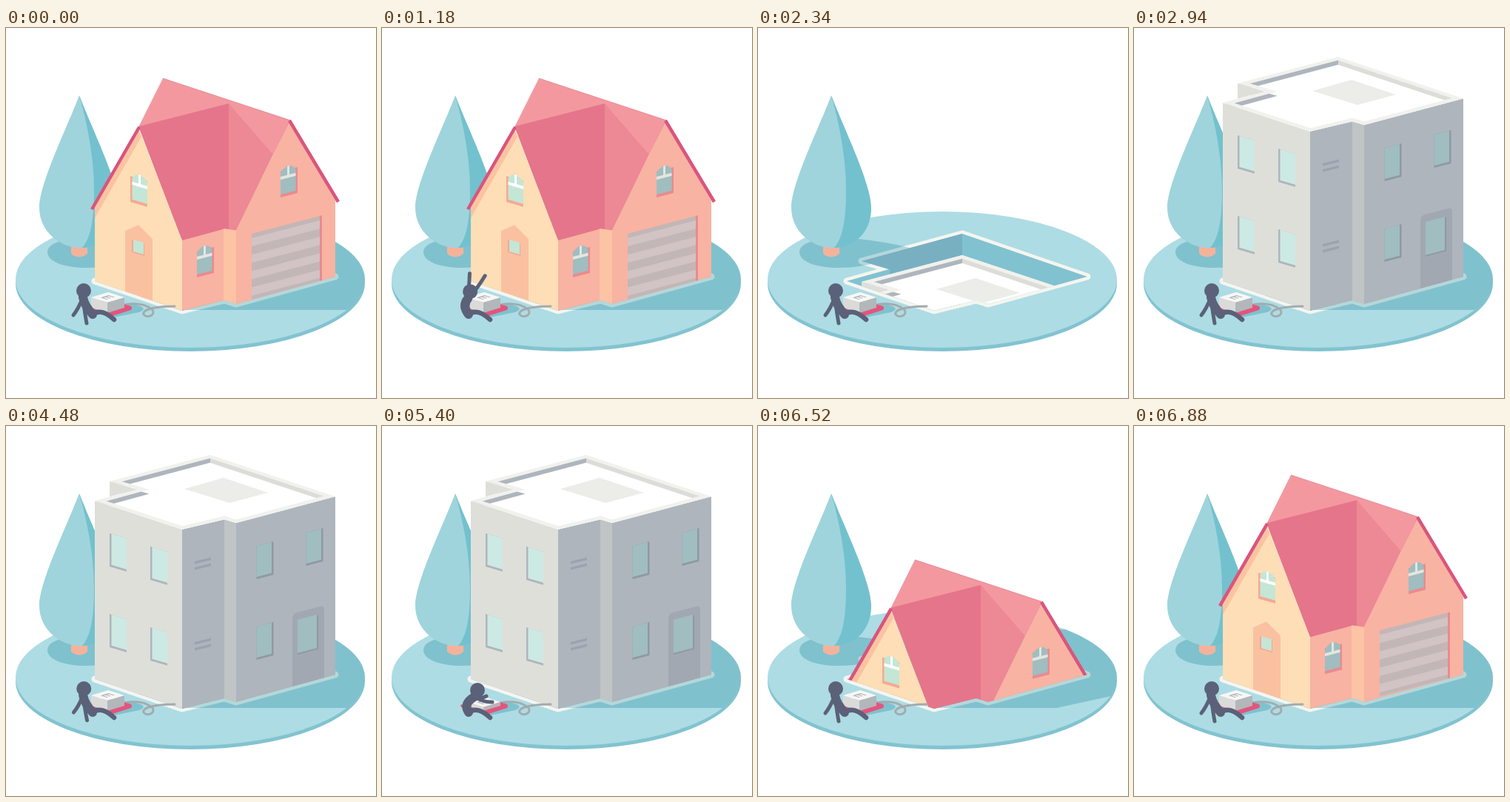
Recreate the animation shown at these times as an HTML page with a canvas. Size 500 by 500 pixels, loop 7880 ms.

```html
<!DOCTYPE html>
<html>
<head>
<meta charset="utf-8">
<style>
html, body { margin: 0; width: 100%; height: 100%; overflow: hidden; background: #fff; }
canvas { display: block; width: 100vw; height: 100vh; }
</style>
</head>
<body>
<canvas id="stage" width="500" height="500"></canvas>
<script>
const g = document.getElementById('stage').getContext('2d');
const LOOP = 7880, HALF = 3980, DEPTH = 320, WALL = 240;
const SHADE = '#bde0e7', GLASS = '#cde9e3', DIM = '#a0bdc0', INK = '#5b6178';
const PALE = '#dfdfda', GRAY = '#aeb5bd', EDGE = '#f1f1ed', TRIM = '#8f99a3';

const layer = draw => { g.save(); draw(); g.restore(); };
const trace = points => {
  g.beginPath();
  points.forEach(p => g.lineTo(...p));
  g.closePath();
};
const poly = (color, ...points) => { trace(points); g.fillStyle = color; g.fill(); };
const shape = (color, d) => { g.fillStyle = color; g.fill(new Path2D(d)); };
const rect = (color, ...r) => { g.fillStyle = color; g.fillRect(...r); };
const line = (color, width, d) => {
  g.strokeStyle = color;
  g.lineWidth = width;
  g.stroke(new Path2D(d));
};
const outline = (color, points) => {
  trace(points);
  g.strokeStyle = color;
  g.lineWidth = 9;
  g.stroke();
};
const oval = (color, x, y, rx, ry) => {
  g.beginPath();
  g.ellipse(x, y, rx, ry, 0, 0, 7);
  g.fillStyle = color;
  g.fill();
};
// Upright parallelogram whose top and bottom fall by `slope`
const slant = (color, x, y, w, h, slope) =>
  poly(color, [x, y], [x + w, y + w * slope], [x + w, y + w * slope + h], [x, y + h]);

const span = (t, a, b) => Math.min(1, Math.max(0, (t - a) / (b - a)));
const sine = p => (1 - Math.cos(Math.PI * p)) / 2;
const mix = (a, b, p) => a.map((v, i) => v + (b[i] - v) * p);

// Footprint: the front chain from left to right, then the back
const FRONT = [[120, 342], [238, 382], [295, 368], [311, 373], [445, 336]];
const BASE = [...FRONT, [276, 278], [140, 315], [177, 326]];
const ROOF = BASE.map(([x, y]) => [x, y * .97 - 230.7]);
const ABOVE = [[100, 336], ...FRONT, [460, 332], [460, -50], [100, -50]];

// How far he leans forward, then both hands
const REST = [0, 91, 388, 109, 399];
const RAISED = [.58, 118, 331, 139, 334];
const PRESS = [1, 141, 365, 149, 373];

// Window in a slanted wall; dir 1 is the left wall, -1 the right one
function pane(x, y, dir, frame, glass, bars) {
  layer(() => {
    g.transform(dir, dir > 0 ? .29 : .26, 0, 1, x, y);
    if (!bars) {
      rect(frame, 0, 0, 23, 45);
      rect(glass, 2.5, 0, 20.5, 42);
      return;
    }
    rect(frame, 0, 2, 23, 35);
    shape(glass, 'M2.5 33V4C5-1 9-3 12.5-3S20-1 23 4V33Z');
    rect(bars, 11, -3, 3, 13);
    rect(bars, 2.5, 9, 20.5, 4);
  });
}

function house() {
  const wall = '#f8b3a2', rose = '#e98b8f', bars = '#e3e6e0';
  poly('#f3989f', [212, 68], [385, 125], [361, 172], [301, 103], [179, 134]);
  poly('#e5758b', [179, 133], [301, 102], [301, 273], [238, 288]);
  poly('#ed8895', [301, 102], [361, 171], [311, 275], [301, 272]);
  poly(wall, [384, 127], [445, 233], [445, 360], [311, 400], [311, 273], [361, 171]);
  slant(wall, 238, 287, 57, 120, -.27);
  slant('#fcc3a5', 294, 271, 17, 120, .15);
  poly('#fedeb6', [180, 137], [238, 287], [238, 400], [120, 400], [120, 240]);
  poly('#fbc3a2', [179, 137], [183, 147], [120, 257], [120, 238]);
  g.lineCap = 'butt';
  line('#e07f90', .8, 'M212 68L385 125');
  line('#d9557d', 4.5, 'M116 245L180 134M383 125L449 235');

  poly('#fac1a0', [161, 274], [179, 266], [198, 285], [198, 380], [161, 367]);
  slant('#f4a893', 170, 286, 17, 17, .29);
  slant('#c4e6d6', 172, 286, 14, 16, .29);
  pane(168, 198, 1, '#f6a992', '#c4e6d6', '#fff');
  pane(281, 294, -1, rose, DIM, bars);
  pane(394, 186, -1, rose, DIM, bars);

  slant('#c3b6b7', 332, 278, 92, 89, -.26);
  for (let y = 284; y < 360; y += 22.2) slant('#d2c4c4', 332, y, 92, 11.1, -.26);
  slant(rose, 424, 254, 3, 89, -.26);
}

function block() {
  const wall = (color, i, j) => {
    const down = ([x, y]) => [x, y + 15];
    poly(color, ROOF[i], ROOF[j], down(BASE[j]), down(BASE[i]));
  };
  wall(PALE, 6, 7);
  [PALE, GRAY, '#c0c4c5', GRAY].forEach((color, i) => wall(color, i, i + 1));

  layer(() => {
    trace(ROOF);
    g.clip();
    rect('#fff', 100, 0, 400, 200);
    // The inner side of the parapet is its own outline, lowered
    const inner = g.createLinearGradient(275, 0, 277, 0);
    inner.addColorStop(.5, GRAY);
    inner.addColorStop(.5, '#dcdcd8');
    outline(inner, ROOF.map(([x, y]) => [x, y + 6]));
    outline(EDGE, ROOF);
  });
  poly('#ecede9', [294, 70], [354, 90], [302, 104], [241, 85]);

  for (const y of [0, 109]) {
    pane(140, 145 + y, 1, GRAY, GLASS);
    pane(195, 163 + y, 1, GRAY, GLASS);
    pane(361.5, 156 + y, -1, TRIM, DIM);
    for (const d of [0, 8]) slant('#9ca3ae', 255, 183 + y + d, 22, 3.5, -.25);
  }
  pane(428.5, 138, -1, TRIM, DIM);
  shape('#a1a8b2', 'M387 353V260Q387 254 393 252L424 244Q430 242 430 249V341Z');
  slant(TRIM, 394, 263, 28, 46, -.27);
  slant(DIM, 394, 262, 26, 45, -.27);
}

function ground(drop) {
  oval('#82c3d0', 249, 345, 236, 92);
  oval('#addce4', 249, 340, 236, 92);
  layer(() => {
    g.clip();
    g.lineJoin = 'round';
    outline('#f5f5f0', BASE);
    g.globalCompositeOperation = 'multiply';
    shape(SHADE, 'M56 303C56 288 85 284 115 284C150 285 180 291 205 297C185 311 150 324 108 324C80 324 56 316 56 303Z');
    const len = 1.3 * (WALL - drop);
    if (len > 0) {
      poly(SHADE, [276, 275], [276 + len, 275], [445 + len, 336], [238 + len, 381], [238, 381]);
    }
    shape(SHADE, 'M118 381L146 391L180 384Q190 380 182 376L165 372Z');
  });
  layer(() => {
    trace(BASE);
    g.clip();
    rect('#81c2d0', 100, 260, 360, 140);
    rect('#78b0c2', 130, 260, 146, 66);
    rect('#78b0c2', 178, 325, 98, 75);
  });
}

function tree() {
  const right = 'C130 297 153 276 153 243C153 210 116 136 99 91Z';
  shape('#f3b39b', 'M88 288H110V305Q99 314 88 305Z');
  shape('#9fd4dc', 'M99 91C82 136 45 210 45 243C45 276 75 297 99 297' + right);
  shape('#73c1ce', 'M99 91C110 130 119 175 119 220C119 260 114 285 103 297' + right);
}

function key(down) {
  line('#a3abae', 3, 'M160 374C175 371 190 373 198 381C203 388 190 393 186 387C183 379 208 376 228 376');
  shape('#e3557c', 'M106 377L138 367L169 376Q171 379 169 381L144 389Q142 390 139 389L107 380Z');
  layer(() => {
    g.translate(0, down);
    slant('#dadbd9', 115, 364, 22, 14 - down, .32);
    slant('#b2b7bb', 137, 371, 23, 14 - down, -.3);
    poly('#f7f7f5', [115, 364], [138, 357], [160, 364], [137, 371]);
    g.transform(.95, .3, -.95, .3, 137.5, 364);
    g.font = 'bold 16px Arial, "Liberation Sans", sans-serif';
    g.textAlign = 'center';
    g.fillStyle = '#adb3b7';
    g.fillText('E', 0, 5.7);
  });
}

function man([lean, ...hands]) {
  const head = [105 + 24 * lean, 355 + 2 * lean];
  const neck = [head[0] - 1 - 3 * lean, head[1] + 9];
  const hip = [117, 387];
  const limb = (w, a, b, c) => line(INK, w, `M${a}Q${b} ${c}`);
  const arm = hand => {
    const [x, y] = mix(neck, hand, .5);
    limb(5, neck, [x, y + 4], hand);
  };
  arm(hands.slice(0, 2));
  limb(12, neck, [106 + 3 * lean, 375], hip);
  limb(6.5, hip, [129, 378], [146, 394]);
  arm(hands.slice(2));
  oval(INK, ...head, 10, 10);
}

function paint(now) {
  const time = now % LOOP;
  const second = time >= HALF;
  const t = second ? time - HALF : time;

  const drop = t < 2180 ? DEPTH * sine(span(t, 1580, 2180))
    : t < 2800 ? DEPTH - (DEPTH + 10) * sine(span(t, 2180, 2800))
    : -10 * (1 - sine(span(t, 2800, 2940)));
  const isBlock = second !== (t >= 2180);

  const slam = span(t, 1140, 1420) ** 2;
  const back = sine(span(t, 1580, 1960));
  const raised = mix(REST, RAISED, sine(span(t, 460, 940)));
  const pose = mix(mix(raised, PRESS, slam), REST, back);
  const down = 9 * span(slam, .6, 1) * (1 - back) ** 2;

  g.clearRect(0, 0, 500, 500);
  ground(drop);
  tree();
  layer(() => {
    trace(drop > WALL ? BASE : ABOVE);
    g.clip();
    g.translate(0, drop);
    isBlock ? block() : house();
  });
  g.lineCap = 'round';
  key(down);
  man(pose);
}

const start = performance.now();
function tick() {
  paint(performance.now() - start);
  requestAnimationFrame(tick);
}
tick();
</script>
</body>
</html>
```
